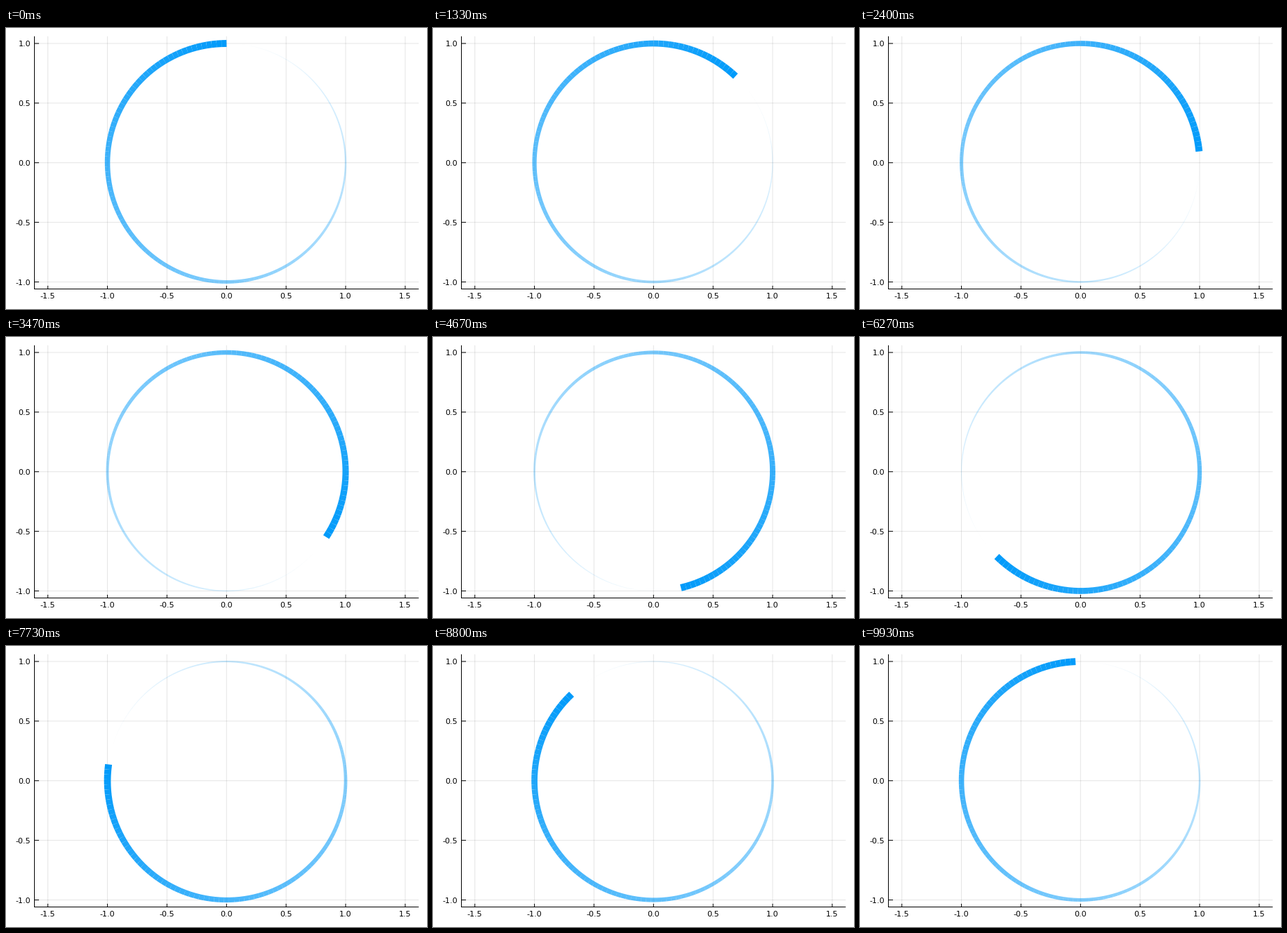
Animation, 600 px wide and 400 px high, one loop 9990 ms. Source, as a matplotlib script:

```python
import numpy as np
import matplotlib.pyplot as plt
from matplotlib.animation import FuncAnimation
from matplotlib.collections import LineCollection

W, H, DPI = 600, 400, 100
PX = 72 / DPI                       # points per pixel
LEFT, RIGHT, TOP, BOTTOM = 40.5, 588.2, 11.8, 371.5
CX, CY, UNIT = 314.3, 191.75, 169.75
N = 150
LOOP_MS = 9990
BLUE = (0, 154 / 255, 250 / 255)

fig = plt.figure(figsize=(W / DPI, H / DPI), dpi=DPI, facecolor="white")
ax = fig.add_axes([0, 0, 1, 1])
ax.set_xlim(0, W)
ax.set_ylim(H, 0)
ax.axis("off")


def line(xs, ys, alpha=1.0):
    ax.plot(xs, ys, color="black", alpha=alpha, lw=PX, snap=False,
            solid_capstyle="butt", zorder=1)


def label(x, y, value, ha):
    ax.text(x, y, f"{value:.1f}", ha=ha, va="baseline", fontsize=8,
            family="DejaVu Sans", color="black")


# Grid, inward ticks and tick labels
for v in np.arange(-3, 4) / 2:
    x = CX + v * UNIT
    line([x, x], [TOP, BOTTOM], 0.1)
    line([x, x], [BOTTOM, BOTTOM - 4.6])
    label(x, 385, v, "center")
for v in np.arange(-2, 3) / 2:
    y = CY - v * UNIT
    line([LEFT, RIGHT], [y, y], 0.1)
    line([LEFT, LEFT + 6.5], [y, y])
    label(35.2, y + 4, v, "right")
line([LEFT, RIGHT], [BOTTOM, BOTTOM])
line([LEFT, LEFT], [TOP, BOTTOM + 0.5])

# Closed circle, clockwise from the top; first and last points coincide
t = np.linspace(0, 2 * np.pi, N)
points = np.column_stack([CX + UNIT * np.sin(t), CY - UNIT * np.cos(t)])

# Width and opacity grow from the tail to the head
ramp = np.linspace(0, 1, N)[:-1]
colors = [(*BLUE, a) for a in ramp]
trail = LineCollection([], linewidths=10 * PX * ramp, colors=colors,
                       capstyle="butt", zorder=2)
trail.set_snap(False)
ax.add_collection(trail, autolim=False)


def update(frame):
    path = np.roll(points, -frame, axis=0)
    trail.set_segments(np.stack([path[:-1], path[1:]], axis=1))
    return [trail]


anim = FuncAnimation(fig, update, frames=N, interval=LOOP_MS / N,
                     repeat=True, repeat_delay=0, blit=False)
plt.show()
```
